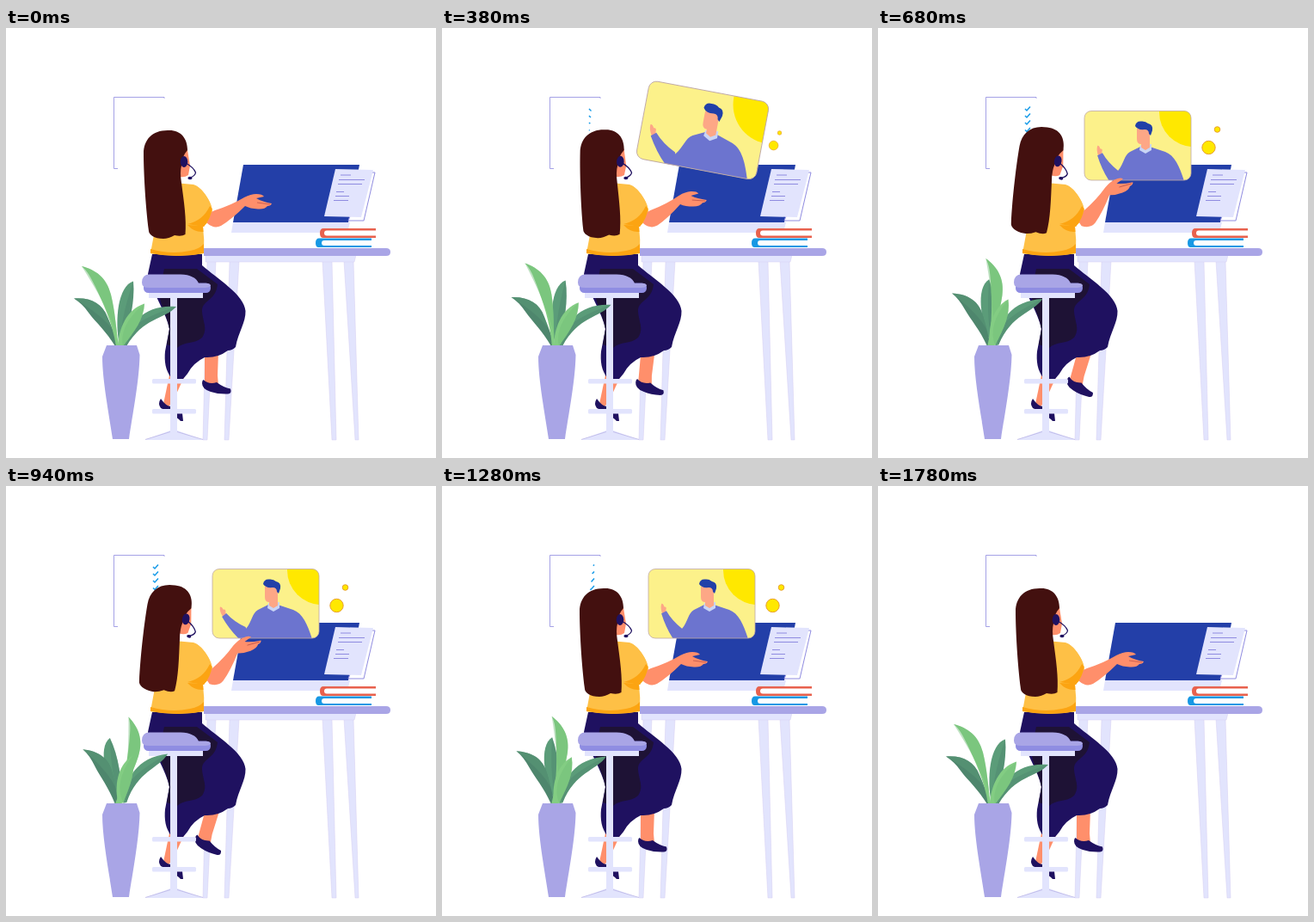
Recreate the animation shown at these times as an HTML page. Size 500x500 px, loop 1800 ms.

```html
<!DOCTYPE html>
<html lang="en">
<head>
<meta charset="utf-8">
<title>Video call at the desk</title>
<style>
html, body { margin: 0; width: 100%; height: 100%; overflow: hidden; background: #fff; }
svg { display: block; width: 100vw; height: 100vh; }
.navy { fill: #1f1160; }
.skin { fill: #ff8f6b; }
.lilac { fill: #a9a5e6; }
.pale { fill: #e2e4fd; }
.sun { fill: #ffe800; }
.line { fill: none; stroke: #8f8be0; stroke-width: 1; }
.check { fill: none; stroke: #179be8; stroke-width: 1.5; }
</style>
</head>
<body>
<svg viewBox="0 0 500 500">
  <defs>
    <clipPath id="card"><rect x="240" y="96.500" width="124" height="80.500" rx="8"/></clipPath>
  </defs>

  <!-- wall sheet -->
  <path class="line" stroke-opacity=".8" d="M184 82V80.500H125.500V163.500H130"/>
  <g id="checks"></g>

  <!-- desk -->
  <g class="pale" stroke="#d5cdf0" stroke-width=".5">
    <path d="M234 271H244L234 479H229Z"/>
    <path d="M260 271H271L259 479H254Z"/>
    <path d="M368 271H379L384 479H379Z"/>
    <path d="M393 271H404L410 479H406Z"/>
    <path d="M232 264H407L405 272H232Z"/>
  </g>
  <path class="lilac" d="M230 256H442Q447 256 447 260.500T442 265H230Z"/>

  <!-- monitor and pages -->
  <path fill="#233fa8" d="M276 159H411L398 226H264Z"/>
  <path class="pale" d="M264 226H400L397 238H262Z"/>
  <path class="line" style="fill:#fff" d="M425 168H429L416 224H398L400 219Z"/>
  <path class="pale" d="M383 164L427 165L413 220L370 219Z"/>
  <path class="line" d="M389 171H401M387 176.500H417M386 181.500H414M384 190.500H393M383 195.500H399M381 200.500H398"/>

  <!-- books -->
  <path fill="#e8614d" d="M430 233H369Q365 233 365 238.500T369 244H430Z"/>
  <path fill="#fff" d="M430 235.500H373Q370 235.500 370 238.500T373 241.500H430Z"/>
  <path fill="#1798e4" d="M425 244.500H364Q360 244.500 360 250T364 255H425Z"/>
  <path fill="#fff" d="M425 247H370Q367 247 367 250T370 253H425Z"/>

  <!-- call window -->
  <g id="popup">
    <g clip-path="url(#card)">
      <rect x="240" y="96" width="124" height="82" fill="#fcf18a"/>
      <circle class="sun" cx="367" cy="98" r="40"/>
      <g id="wave">
        <path fill="#fda786" d="M255 152C252 146 251 142 252 138.500Q254 138 255.500 142Q258 141 258 144Q257 147 260 150Z"/>
        <path fill="#6c74cf" d="M253 150L258.500 146.500Q266 157 279 165L282 178H270Q260 166 253 150Z"/>
      </g>
      <path fill="#6c74cf" d="M270 178L279 166C286 158 286 148 293 144L305 138H316L334 144C345 148 351 162 356 178Z"/>
      <path fill="#c9d5f5" d="M305 136L318 135L318 142L311 146L304 142Z"/>
      <path fill="#fda786" d="M301 117L316 118L316 131L316 139L311 142L306 139V135Q301 135 301 129Z"/>
      <path fill="#2140a8" d="M299 114Q300 108 306 108.500Q311 108 314 111Q320 112 319 119L317 125L315 123Q315 118 310 118Q302 119 299 114Z"/>
    </g>
    <rect x="240" y="96.500" width="124" height="80.500" rx="8" fill="none" stroke="#bfa9a5" stroke-width=".8"/>
  </g>
  <g id="dots" class="sun" stroke="#e8a030" stroke-width="1">
    <circle cx="384.500" cy="139" r="7.700"/>
    <circle cx="394.500" cy="118" r="3.300"/>
  </g>

  <!-- legs and skirt -->
  <path class="skin" d="M190 404H208L195 432L188 442L183 437Z"/>
  <path class="navy" d="M180 431Q186 440 192 440Q198 446 205 448L206 457H203L201 455Q190 446 180 442Q176 437 180 431Z"/>
  <g id="foot">
    <path class="skin" d="M231 378L247 376L246 404L247 416L231 415Z"/>
    <path class="navy" d="M229.500 409Q236 415 245 412Q253 418 261 419.500Q263 425 258 425.500Q247 426 238 423Q228 420 228 413Q228 410 229.500 409Z"/>
  </g>
  <path class="navy" d="M170 263H228V276C246 292 277 310 278.500 329C279 342 270 354 267 371Q263 375 258 375Q246 384 231 383Q218 389 211 402L206 408H193C185 398 184 387 185 376L190 350C186 330 172 312 165 286Z"/>
  <path fill="#1e1235" d="M184 280H222L246 298C244 318 227 316 228 330C229 342 235 350 228 360C219 368 207 364 199 372L187 368L190 350C187 332 180 325 178 308Z"/>

  <!-- stool -->
  <g class="pale">
    <rect x="166" y="307" width="63" height="7"/>
    <rect x="191" y="313" width="8" height="158"/>
    <rect x="170" y="408" width="51" height="5.500" rx="1.500"/>
    <rect x="170" y="443" width="51" height="5.500" rx="1.500"/>
    <path d="M191 468H199L229 479H162Z"/>
  </g>
  <path fill="none" stroke="#b9b4e6" stroke-width=".8" d="M162 478.500L191 469.500M199 469.500L229 478.500"/>
  <rect x="160" y="296.500" width="78" height="11.500" rx="5.500" fill="#8f8de2"/>
  <path class="lilac" d="M158 296Q158 286.500 167 286.500H203Q220 287 224 297H234Q238 297 238 300Q236 302 232 302H166Q158 302 158 296Z"/>

  <!-- torso and arm -->
  <path fill="#fec046" d="M196 180L218 182C228 185 238 201 240 212Q239 224 229 231Q231 246 230 262Q200 268 168 262L173 235L180 200Z"/>
  <path fill="#fca412" d="M168 257Q192 264 214 259Q225 257 230 251V262Q200 268 168 262ZM211 229L229 230L229.500 237Q219 238 211 229Z"/>
  <g id="arm" class="skin">
    <path d="M232 217L243 212Q262 206 277 197Q285 193 291 193Q298 193 300 196L291 198Q298 202 309 204Q308 207 304 207Q301 211 293 210.500Q284 210 278 207Q263 222 250 230Q242 234 234 227Z"/>
    <path d="M292 203L307 205" stroke="#b64c45" stroke-width=".7"/>
  </g>
  <path fill="#fec046" d="M207 184L220 183C230 188 239 203 239.500 211Q237 222 230 231L213 226Z"/>
  <path fill="#fca412" d="M239.500 210Q238 222 230 231L211 228Q229 224 237 207Z"/>

  <!-- head -->
  <g id="head">
    <path class="skin" d="M203 130Q211 135 212 148L214 160L212 171Q208 174 202 173V181H195Z"/>
    <path fill="#43100f" d="M188 119C203 118 211 128 211 142Q204 150 204 160Q202 168 204 180C207 203 210 222 208.500 240Q204 243 196 241Q189 245 183 245C172 245 166 240 166 236C162 205 160 165 160 146C160 130 170 119 188 119Z"/>
    <path fill="none" stroke="#1f1160" stroke-width="1.300" d="M209 157Q218 162 220.500 168Q220 172 214 174"/>
    <ellipse class="navy" cx="207" cy="155.500" rx="4.300" ry="6.500"/>
    <ellipse class="navy" cx="214" cy="174.500" rx="2.600" ry="1.800"/>
  </g>

  <!-- plant -->
  <g id="plant"></g>
  <path class="lilac" d="M117 369H152L155.500 380C155 410 147 450 143 478H124C120 450 112 410 112 382Z"/>
</svg>
<script>
const LOOP = 1800;
const $ = id => document.getElementById(id);
const clamp = x => Math.min(1, Math.max(0, x));
const span = (t, a, b) => clamp((t - a) / (b - a));
const sine = x => (1 - Math.cos(Math.PI * x)) / 2;
const smooth = x => x * x * (3 - 2 * x);
const there = (t, a, b, c, d) => sine(span(t, a, b)) * (1 - sine(span(t, c, d)));

function add(parent, tag, attrs) {
  const el = document.createElementNS("http://www.w3.org/2000/svg", tag);
  for (const k in attrs) el.setAttribute(k, attrs[k]);
  parent.append(el);
  return el;
}
const pose = (el, value) => el.setAttribute("transform", value);
const spin = (el, deg, x, y) => pose(el, `rotate(${deg} ${x} ${y})`);
const show = (el, on) => { el.style.display = on ? "" : "none"; };
const about = (x, y, s, deg = 0) =>
  `translate(${x} ${y}) rotate(${deg}) scale(${s}) translate(${-x} ${-y})`;

const checks = [94, 102, 110, 118.5].map(y =>
  add($("checks"), "path", { d: `M171 ${y}l2 2l4 -4.500`, class: "check", pathLength: 10 }));

// near edge (base to tip), far edge (tip to base), fill, shade, swing in degrees
const leaves = [
  ["M132 370C126 340 130 300 148 294.500", "C150 318 144 345 134 370", "#5b9c79", "#4e866d", -21],
  ["M127 370C116 352 105 343 96 331C91 324 86 319 79 314.500", "C98 313 112 320 118 336C124 350 128 360 131 370", "#4e866d", "#5b9c79", 10.4],
  ["M136 370C144 342 162 321 198 324", "C184 339 160 336 140 370", "#5b9c79", "#4e866d", -11.5],
  ["M128 370C124 343 112 318 104 301C98 289 95 283 88 277", "C104 281 117 290 122 310C127 330 128 350 131 370", "#83cd83", "#72bd79", 32.3],
  ["M130 370C131 350 140 327 161 320.500", "C160 339 150 352 136 370", "#83cd83", "#72bd79", -16]
].map(([near, far, fill, shade, swing]) => {
  const g = add($("plant"), "g");
  add(g, "path", { d: near + far + "Z", fill });
  const tip = near.split(/[ C]/).slice(-2).join(" ");
  add(g, "path", { d: `M${tip}${far}Q131 345 ${tip}Z`, fill: shade, opacity: 0.45 });
  return { g, swing };
});

function popupScale(t) {
  const peak = 1.17;
  if (t < 330) return peak * (1 - (1 - span(t, 140, 330)) ** 2);
  if (t < 1320) return peak - (peak - 1) * smooth(span(t, 330, 530));
  if (t < 1480) return 1 + (peak - 1) * smooth(span(t, 1320, 1480));
  return peak * (1 - span(t, 1480, 1700) ** 2.5);
}

function dotScale(t) {
  if (t < 430) return 1.1 * sine(span(t, 312, 430));
  if (t < 1480) return 1.1 - 0.1 * smooth(span(t, 430, 540));
  if (t < 1560) return 1 + 0.07 * smooth(span(t, 1480, 1560));
  return 1.07 * (1 - span(t, 1560, 1700) ** 2);
}

function draw(t) {
  const s = popupScale(t);
  show($("popup"), s > 0.01);
  pose($("popup"), about(363, 177, s, 75 * (s - 1)));
  spin($("wave"), -6.5 * Math.cos(2 * Math.PI * (t - 960) / 600), 270, 168);

  const d = dotScale(t);
  show($("dots"), d > 0.01);
  pose($("dots"), about(388, 131, d));

  checks.forEach((el, i) => {
    const end = 10 * span(t, 300 + 20 * i, 500 + 20 * i);
    const start = 10 * span(t, 1200 + 20 * i, 1300 + 20 * i);
    show(el, end > start);
    el.style.strokeDasharray = `${end - start} 30`;
    el.style.strokeDashoffset = -start;
  });

  const lean = there(t, 300, 620, 920, 1260);
  pose($("head"), `translate(${-2 * lean} ${-4 * lean}) rotate(${10 * lean} 190 181)`);
  spin($("arm"), -23.5 * lean, 243, 222);
  spin($("foot"), 15.5 * there(t, 240, 600, 920, 1260), 239, 381);

  const sway = there(t, 160, 1000, 1000, 1800);
  leaves.forEach(l => spin(l.g, l.swing * sway, 130, 368));
}

function tick() {
  draw(performance.now() % LOOP);
  requestAnimationFrame(tick);
}
tick();
</script>
</body>
</html>
```
